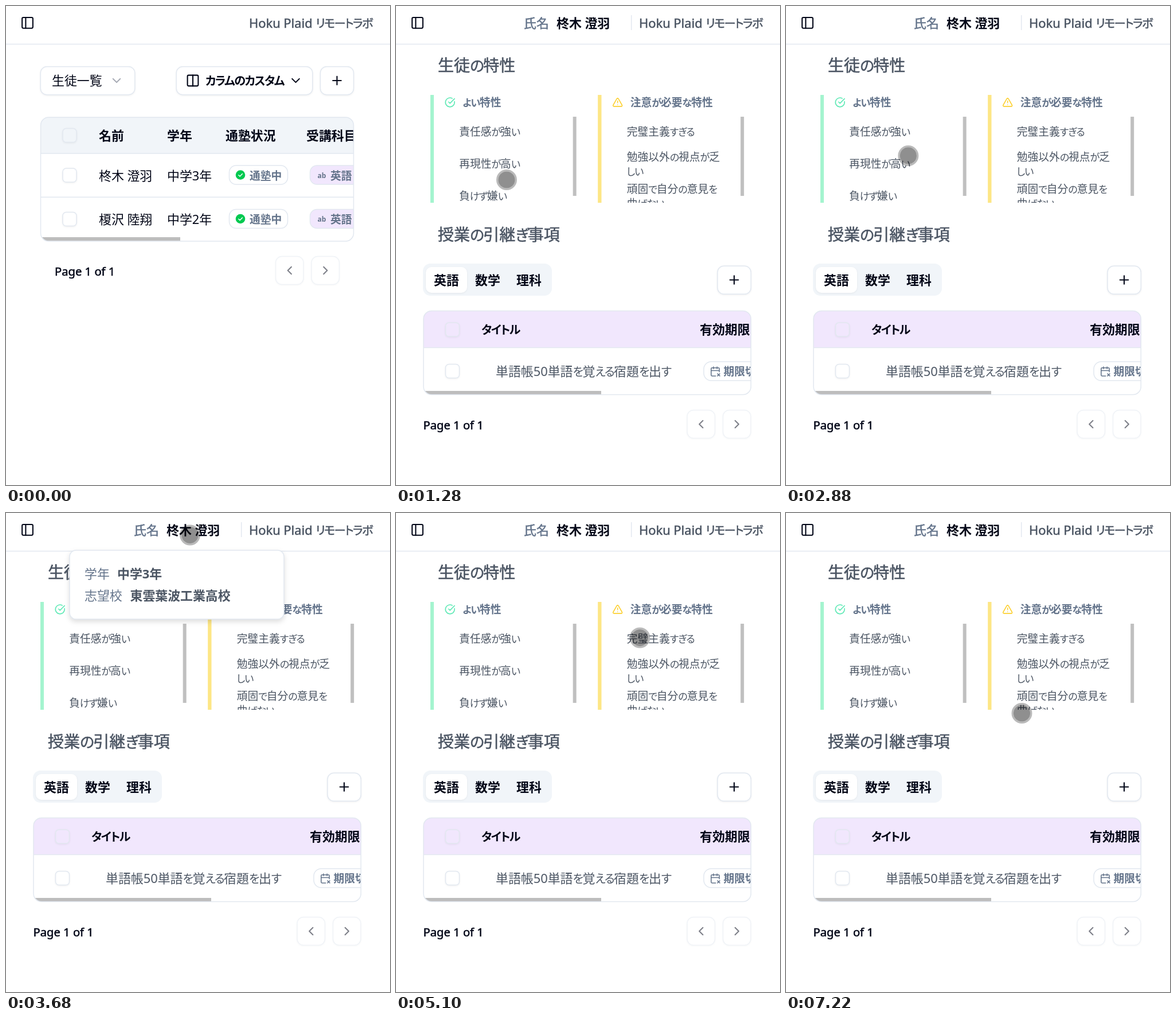
An HTML page that plays this animation: 670x835 px, repeating every 7290 ms.

```html
<!DOCTYPE html>
<html lang="ja">
<head>
<meta charset="utf-8">
<title>生徒管理</title>
<style>
  html, body { margin: 0; width: 100%; height: 100%; overflow: hidden; background: #fff; }
  svg { display: block; width: 670px; height: 835px; }
  text { font-family: "Noto Sans", "Noto Sans CJK JP", "Noto Sans CJK", sans-serif; white-space: pre; }
  .kana { font-size: .92em; letter-spacing: -.075em; font-feature-settings: "palt"; }
  .mark { letter-spacing: .12em; font-feature-settings: "palt"; }
  .medium { stroke-width: .55; }
  .icon { fill: none; stroke-width: 2; stroke-linecap: round; stroke-linejoin: round; }
  .raised { filter: drop-shadow(0 1.5px 1.5px rgba(0, 0, 0, .06)); }
  .popup { transform-box: fill-box; transform-origin: center; }
  .popup > rect { filter: drop-shadow(0 4px 4px rgba(0, 0, 0, .13)); }
</style>
</head>
<body>
<svg id="stage" viewBox="0 0 670 835"></svg>
<script>
const INK = '#020617', SLATE = '#64748b', GRAY = '#4b5563', LINE = '#e2e8f0';
const MINT = '#5ee9b5', AMBER = '#fcd030', LILAC = '#f1e7fd', MIST = '#f1f5f9';
const LOOP = 7290, STEP = 60;
const STUDENT = '柊木 澄羽';

const ICONS = {
  panel: '<rect x="3" y="3" width="18" height="18" rx="2"/><path d="M9 3v18"/>',
  columns: '<rect x="3" y="3" width="18" height="18" rx="2"/><path d="M12 3v18"/>',
  down: '<path d="m6 9 6 6 6-6"/>',
  left: '<path d="m15 18-6-6 6-6"/>',
  right: '<path d="m9 18 6-6-6-6"/>',
  plus: '<path d="M5 12h14M12 5v14"/>',
  check: '<path d="M21.8 10A10 10 0 1 1 17 3.3M9 11l3 3L22 4"/>',
  warn: '<path d="m21.7 18-8-14a2 2 0 0 0-3.5 0l-8 14A2 2 0 0 0 4 21h16a2 2 0 0 0 1.7-3ZM12 9v4M12 17h.01"/>',
  calendar: '<path d="M8 2v4M16 2v4M3 10h18M21 13V6a2 2 0 0 0-2-2H5a2 2 0 0 0-2 2v14a2 2 0 0 0 2 2h8M17 17l5 5M17 22l5-5"/>'
};

// Text is placed by its left edge and the vertical middle of its line.
// Medium weight is a regular face with a hairline outline.
const text = (x, cy, str, size = 21.9, weight = 400, color = INK) => {
  const medium = weight === 500;
  return `<text x="${x}" y="${cy + size * .38}" font-size="${size}" font-weight="${medium ? 400 : weight}" ` +
    `fill="${color}" ${medium ? `class="medium" stroke="${color}"` : ''}>` +
    str.replace(/[ぁ-んァ-ヶー]+/g, '<tspan class="kana">$&</tspan>')
      .replace(/[、。]/g, '<tspan class="mark">$&</tspan>') + '</text>';
};

const box = (x, y, w, h, r = 0, fill = '#fff', stroke = 'none', cls = '') =>
  `<rect x="${x}" y="${y}" width="${w}" height="${h}" rx="${r}" fill="${fill}" stroke="${stroke}" stroke-width="1.5" class="${cls}"/>`;

const icon = (name, cx, cy, color = INK, size = 25) =>
  `<g class="icon" stroke="${color}" transform="translate(${cx} ${cy}) scale(${size / 24}) translate(-12 -12)">${ICONS[name]}</g>`;

const line = (x1, y1, x2, y2) =>
  `<path d="M${x1} ${y1}L${x2} ${y2}" stroke="${LINE}" stroke-width="1.5"/>`;

const button = (x, y, w, h = 49) => box(x, y, w, h, 11, '#fff', LINE, 'raised');
const checkbox = (cx, cy, fill = '#fff') => box(cx - 12, cy - 12, 24, 24, 6, fill, LINE, 'raised');
const clip = (id, x, y, w, h, r, body) =>
  `<clipPath id="${id}">${box(x, y, w, h, r)}</clipPath><g clip-path="url(#${id})">${body}</g>`;

const pager = (textX, buttonX, cy) =>
  text(textX, cy, 'Page 1 of 1', 20.2, 500) +
  ['left', 'right'].map((dir, i) => {
    const x = buttonX + i * 62.5;
    return `<g opacity=".5">${button(x, cy - 25.5, 48.5)}${icon(dir, x + 24.3, cy - 1)}</g>`;
  }).join('');

const studentRow = (cy, name, grade) =>
  checkbox(111, cy - .5) + text(162, cy, name) + text(281, cy, grade) +
  box(389.5, cy - 17.5, 102, 33, 12, '#fff', LINE) +
  `<circle cx="409" cy="${cy - 1}" r="8.3" fill="#00c950"/>` +
  `<path class="icon" d="m405.8 ${cy - .8} 2.3 2.3 4.3-4.5" stroke="#fff" style="stroke-width:1.5"/>` +
  text(425, cy, '通塾中', 18.75, 700, SLATE) +
  box(530.5, cy - 17.5, 110, 33, 12, LILAC, LINE) +
  text(543.5, cy - .5, 'ab', 12, 600, SLATE) +
  text(566, cy, '英語', 18.75, 700, SLATE);

const listPage = () =>
  button(60.3, 105.8, 164.5) + text(80, 130, '生徒一覧') + icon('down', 193, 130, '#a5a9b3') +
  button(297.3, 105.8, 237.5) + icon('columns', 326, 130) +
  text(348, 130, 'カラムのカスタム', 21.9, 600) + icon('down', 505.5, 130) +
  button(548.5, 105.8, 58) + icon('plus', 577.5, 130) +
  clip('students', 60.5, 194, 546, 216, 14,
    box(60, 193, 548, 64, 0, MIST) + checkbox(111, 225.5, MIST) +
    text(162, 226, '名前', 21.9, 700) + text(281, 226, '学年', 21.9, 700) +
    text(383, 226, '通塾状況', 21.9, 700) + text(524, 226, '受講科目', 21.9, 700) +
    studentRow(295.5, STUDENT, '中学3年') + studentRow(372, '榎沢 陸翔', '中学2年') +
    line(60, 257, 607, 257) + line(60, 333.3, 607, 333.3) +
    box(60, 403, 244, 6.5, 0, '#bdbdbd')) +
  box(60.5, 194, 546, 216, 14, 'none', LINE) +
  pager(85, 470.5, 462);

const traits = (x, color, mark, markColor, label, items) =>
  box(x, 155, 6.3, 188, 0, color) + icon(mark, x + 34.5, 168, markColor, 19) +
  text(x + 56.5, 168, label, 18.75, 600, SLATE) +
  items.map(([cy, str]) => text(x + 50.5, cy, str, 18.75, 400, GRAY)).join('') +
  box(x + 249, 193, 6, 138, 0, '#c0c0c0');

const detailPage = () =>
  text(223, 30, '氏名', 21.9, 500, SLATE) + text(280, 30, STUDENT, 21.9, 600) + line(410.7, 16, 410.7, 42) +
  text(73, 103.5, '生徒の特性', 28.1, 500, GRAY) +
  clip('traits', 60, 150, 560, 193, 0,
    traits(59.7, '#a4f4cf', 'check', MINT, 'よい特性',
      [[218.5, '責任感が強い'], [275, '再現性が高い'], [331, '負けず嫌い']]) +
    traits(352.2, '#fde685', 'warn', AMBER, '注意が必要な特性',
      [[218.5, '完璧主義すぎる'], [262.5, '勉強以外の視点が乏'], [287.5, 'しい'],
       [319, '頑固で自分の意見を'], [344, '曲げない']])) +
  text(73, 398, '授業の引継ぎ事項', 28.1, 500, GRAY) +
  box(47, 449, 225, 56, 13, MIST) + box(52, 455, 72, 45, 10, '#fff', 'none', 'raised') +
  ['英語', '数学', '理科'].map((s, i) => text(66 + i * 72, 478, s, 21.9, 600)).join('') +
  button(561, 453.3, 58.3) + icon('plus', 590, 477.5) +
  clip('tasks', 48, 531.5, 571.3, 146, 14,
    box(47, 531, 574, 64.5, 0, LILAC) + checkbox(98.5, 564, LILAC) +
    text(149, 564, 'タイトル', 21.9, 700) + text(530, 564, '有効期限', 21.9, 700) +
    line(47, 595.5, 620, 595.5) + checkbox(98.5, 636.5) +
    text(174, 637, '単語帳50単語を覚える宿題を出す', 21.9, 400, GRAY) +
    box(537, 620, 120, 33, 13, '#fff', LINE) + icon('calendar', 557, 637, SLATE, 19) +
    text(571.5, 637, '期限切れ', 18.75, 700, SLATE) +
    box(47, 671, 311, 6.5, 0, '#bdbdbd')) +
  box(48, 531.5, 571.3, 146, 14, 'none', LINE) +
  pager(47.5, 508, 730);

const popup = (x, y, w, h, body) => `<g class="popup">${box(x, y, w, h, 11, '#fff', LINE)}${body}</g>`;

const popups = () =>
  popup(-2, 362.5, 499, 120, icon('check', 33, 404, MINT, 19) +
    text(56, 404, '負けず嫌い', 21.9, 700) + text(25, 442, '自分に厳しく、他人と競うことが好き')) +
  popup(111, 65, 374, 120,
    text(137, 106, '学年', 21.9, 400, SLATE) + text(194, 106, '中学3年', 21.9, 700, GRAY) +
    text(137, 144, '志望校', 21.9, 400, SLATE) + text(216.5, 144, '東雲葉波工業高校', 21.9, 700, GRAY)) +
  popup(170, 250, 499, 183, icon('warn', 205, 291, AMBER, 19) +
    text(227, 291.5, '完璧主義すぎる', 21.9, 700) +
    ['自分に厳しいので、小さいミスでもかなり落ち込んでし',
     'まう。講師はそれをほめるのではなく、ミスをしてもそこ',
     'まで影響が少ないことを伝えていく必要あり'].map((s, i) => text(196.5, 329 + i * 31.4, s)).join(''));

document.getElementById('stage').innerHTML =
  `<g id="list">${listPage()}</g><g id="detail">${detailPage()}</g>` +
  icon('panel', 37.5, 29.3) + line(0, 66.5, 670, 66.5) +
  text(424, 30, 'Hoku Plaid リモートラボ', 21.9, 500, GRAY) + popups() +
  `<g id="cursor"><circle r="14.6" fill-opacity=".44"/>
   <circle r="16.3" fill="none" stroke="#000" stroke-opacity=".27" stroke-width="3.4"/></g>`;

// The pointer moves in discrete steps: [time, x, y].
const ease = (u, p) => 1 - (1 - u ** 1.3) ** p;
const glide = (start, end, count, [x0, y0], [x1, y1], powerY) =>
  Array.from({ length: count }, (_, i) => {
    const u = (i + 1) / count;
    return [start + (end - start) * i / (count - 1),
      x0 + (x1 - x0) * ease(u, 2.5), y0 + (y1 - y0) * ease(u, powerY)];
  });
const entry = [[564, 740], [476, 606], [410, 505], [343, 452], [297, 405],
  [258, 366], [228, 337], [210, 321], [200, 312], [196, 308]];
const path = [
  ...entry.map(([x, y], i) => [190 + i * 67, x, y]),
  [1070, 193, 307], [1280, 193, 303],
  ...glide(2870, 3340, 8, [193, 303], [321, 38.5], 2.5),
  [4220, 322, 39],
  ...glide(4690, 5295, 10, [322, 39], [435, 221], 4),
  [7220, 411.5, 349]
];

const spans = [[1540, 2615], [3540, 4370], [5440, 6825]];
const popupNodes = document.querySelectorAll('.popup');
const [list, detail, cursor] = ['list', 'detail', 'cursor'].map(id => document.getElementById(id));
const show = (node, on) => node.style.display = on ? '' : 'none';

function drawPopup(node, t, [open, close]) {
  const closing = t >= close;
  const stage = Math.floor((t - (closing ? close : open)) / STEP);
  const level = t < open ? 0 : closing ? [.6, .2][stage] ?? 0 : [.2, .75][stage] ?? 1;
  show(node, level > 0);
  node.style.opacity = level;
  const slide = closing ? 0 : -12 * (1 - level);
  node.style.transform = `translateY(${slide}px) scale(${.95 + .05 * level})`;
}

const began = performance.now();
function draw() {
  const t = (performance.now() - began) % LOOP;
  show(list, t < 1210);
  show(detail, t >= 1210);
  popupNodes.forEach((node, i) => drawPopup(node, t, spans[i]));
  const spot = path.filter(p => p[0] <= t).pop();
  show(cursor, spot);
  if (spot) cursor.setAttribute('transform', `translate(${spot[1]} ${spot[2]})`);
  requestAnimationFrame(draw);
}
draw();
</script>
</body>
</html>
```
